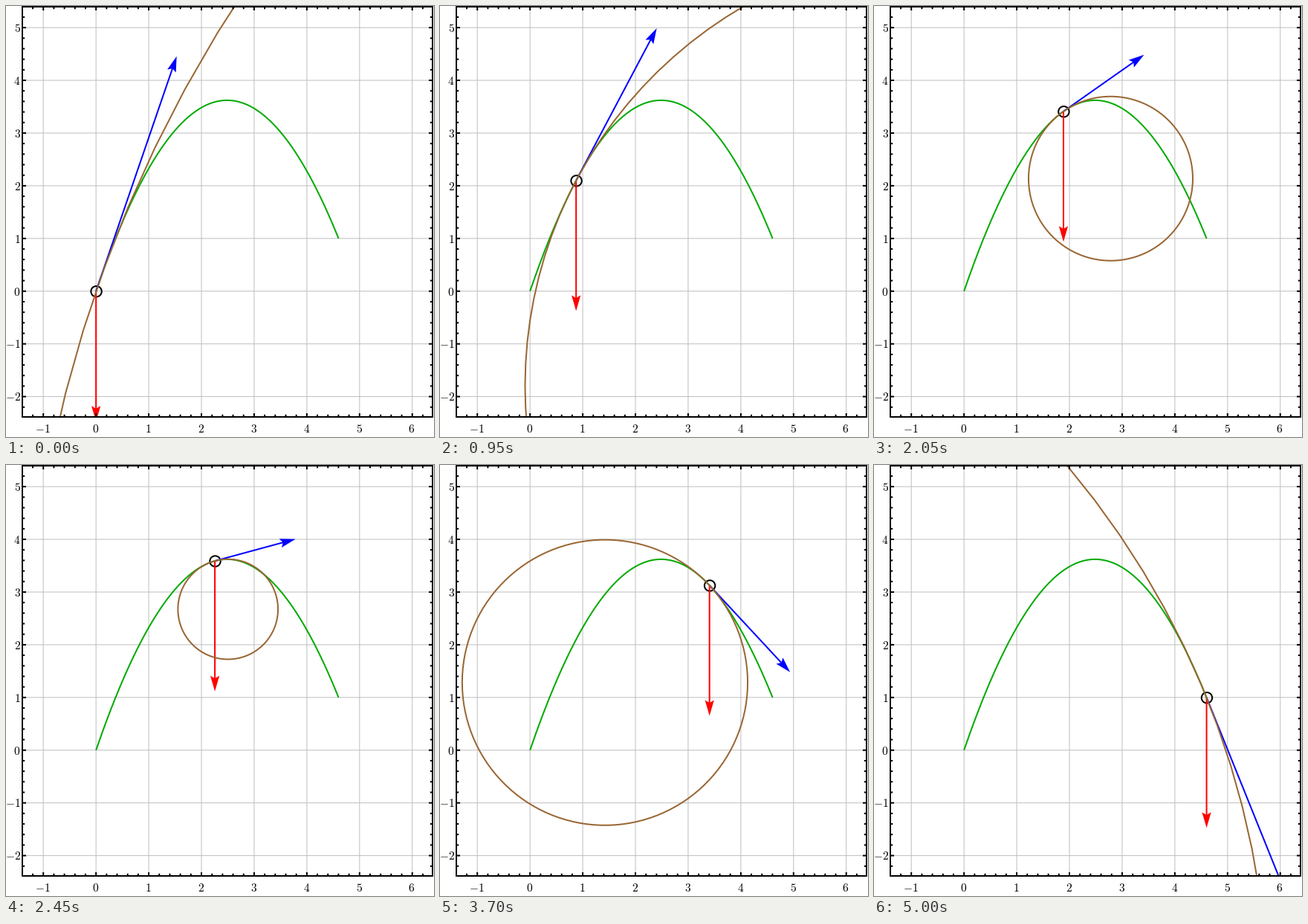
These frames come from a looping animation (576x580 px, 5050 ms). A matplotlib script:

```python
import numpy as np
import matplotlib.pyplot as plt
from matplotlib.animation import FuncAnimation
from matplotlib.patches import Circle, Polygon, Rectangle

W, H, DPI = 576, 580, 100
PX = 72 / DPI                         # points per pixel
X0, Y0, UNIT = 121.15, 383.75, 70.93  # plot origin and scale in pixels
LEFT, TOP, SIDE = 22, 1, 552          # frame box

SLOPE, BEND = 2.9129, 0.58576         # y = SLOPE * x - BEND * x^2
X_END, STEPS = 4.602, 100
VEL, ACC = 1.53, 2.474                # arrow lengths in plot units
HEAD, HALF, NOTCH = 21, 6.1, 3.6      # arrowhead in pixels

plt.rcParams["mathtext.fontset"] = "cm"


def to_px(x, y):
    return X0 + UNIT * np.asarray(x), Y0 - UNIT * np.asarray(y)


def height(x):
    return SLOPE * x - BEND * x * x


fig = plt.figure(figsize=(W / DPI, H / DPI), dpi=DPI, facecolor="white")
ax = fig.add_axes([0, 0, 1, 1])
ax.set_xlim(0, W)
ax.set_ylim(H, 0)
ax.axis("off")

box = Rectangle((LEFT, TOP), SIDE, SIDE, fill=False, ec="black",
                lw=2 * PX, zorder=9)
ax.add_patch(box)


def line(xs=(), ys=(), color="black", width=2, z=1):
    item, = ax.plot(xs, ys, color=color, lw=width * PX, zorder=z, snap=False,
                    solid_capstyle="butt", solid_joinstyle="round")
    item.set_clip_path(box)
    return item


class Arrow:
    def __init__(self, color, z):
        self.shaft = line(color=color, z=z)
        self.head = Polygon(np.zeros((4, 2)), fc=color, lw=0, zorder=z)
        ax.add_patch(self.head)
        self.head.set_clip_path(box)

    def point(self, start, end):
        start, end = np.array(start), np.array(end)
        along = (end - start) / np.hypot(*(end - start))
        side = np.array([-along[1], along[0]])
        back = end - HEAD * along
        notch = back + NOTCH * along
        self.shaft.set_data(*np.transpose([start, notch + along]))
        self.head.set_xy([end, back + HALF * side, notch, back - HALF * side])


def draw_axes():
    right, bottom = LEFT + SIDE, TOP + SIDE
    for k in range(-11, 32):
        major = k % 5 == 0
        size = 5 if major else 3.2
        x, y = to_px(k / 5, k / 5)
        if LEFT < x < right:
            for edge, inner in ((TOP, TOP + size), (bottom, bottom - size)):
                line([x, x], [edge, inner], z=8)
            if major:
                line([x, x], [TOP, bottom], "#bfbfbf", 1, 0)
                ax.text(x - 0.7, 574.3, f"${k // 5}$", size=15.5 * PX,
                        ha="center", va="baseline")
        if TOP < y < bottom:
            for edge, inner in ((LEFT, LEFT + size), (right, right - size)):
                line([edge, inner], [y, y], z=8)
            if major:
                line([LEFT, right], [y, y], "#bfbfbf", 1, 0)
                ax.text(19.6, y + 5.8, f"${k // 5}$", size=15.5 * PX,
                        ha="right", va="baseline")


draw_axes()
path = np.linspace(0, X_END, 200)
line(*to_px(path, height(path)), color="#00aa00", z=2)

ball = Circle((0, 0), 7.2, fill=False, ec="black", lw=2 * PX, zorder=3)
ax.add_patch(ball)
velocity = Arrow("#0000ff", 4)
gravity = Arrow("#ff0000", 5)
osculating = line(color="#996633", z=6)
turn = np.linspace(0, 2 * np.pi, 127)


def update(i):
    x = X_END * i / STEPS
    y = height(x)
    slope = SLOPE - 2 * BEND * x
    here = to_px(x, y)
    ball.center = here[0] + 0.4, here[1] + 0.4
    velocity.point(here, to_px(x + VEL, y + VEL * slope))
    gravity.point(here, to_px(x, y - ACC))

    # circle of curvature: centre lies below the path on its normal
    norm = 1 + slope ** 2
    radius = norm ** 1.5 / (2 * BEND)
    cx = x + slope * norm / (2 * BEND)
    cy = y - norm / (2 * BEND)
    osculating.set_data(*to_px(cx + radius * np.cos(turn),
                               cy + radius * np.sin(turn)))
    return ()


anim = FuncAnimation(fig, update, frames=STEPS + 1, interval=50,
                     init_func=lambda: update(0), repeat=True, repeat_delay=0)
plt.show()
```
